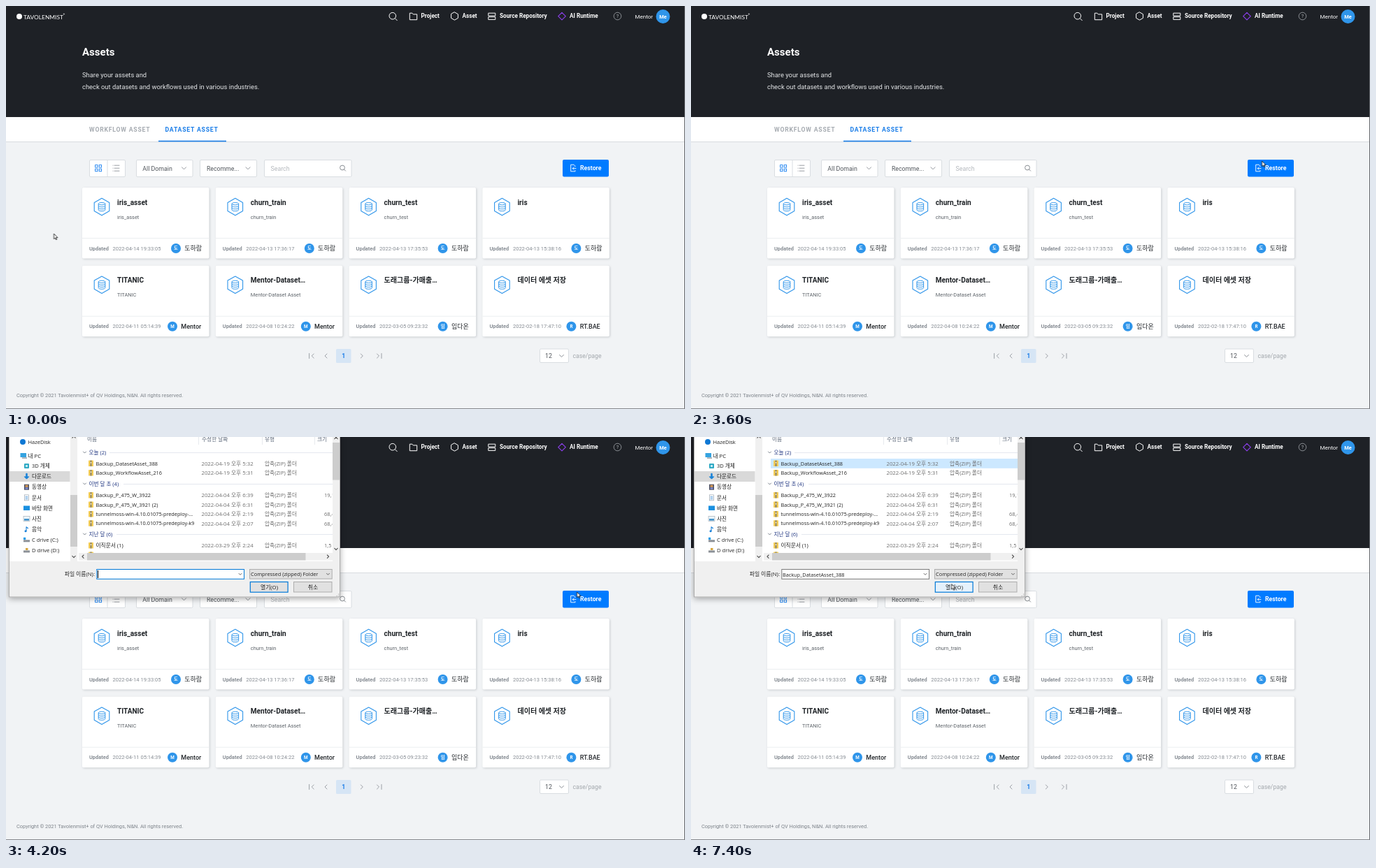
Animation of 971 by 577 pixels, one loop 8 s. Source, as an HTML page:

```html
<!DOCTYPE html>
<html lang="ko">
<head>
<meta charset="utf-8">
<title>Dataset assets</title>
<style>
html, body { margin: 0; width: 100%; height: 100%; overflow: hidden; background: #f1f3f5; }
svg { display: block; font-family: Roboto, "Noto Sans CJK KR", "Noto Sans CJK", sans-serif; }
text { white-space: pre; }
.b { font-weight: 700; }
.m { font-weight: 500; }
.line { fill: none; stroke-linecap: round; stroke-linejoin: round; }
.card { filter: drop-shadow(1px 1.5px 1.5px rgba(40, 50, 60, .2)); }
.dlg { font-family: "Open Sans", "Noto Sans CJK KR", "Noto Sans CJK", sans-serif; transform-origin: 240.5px 59px; }
.frame { filter: drop-shadow(0 2px 4px rgba(0, 0, 0, .35)); }
</style>
</head>
<body>
<script>
const LOOP = 8000;
const BLUE = '#2f95ea';
let css = '';

// Hard-stepped keyframes from [ms, declarations] pairs.
function steps(name, list) {
  const keys = list.map(([ms, decl]) => `${ms / LOOP * 100}% { ${decl} }`).join(' ');
  css += `@keyframes ${name} { ${keys} } .${name} { animation: ${name} ${LOOP}ms step-end infinite; }\n`;
}
// Visible only within the given [from, to] spans.
function visible(name, ...spans) {
  const list = [[0, 'opacity: 0']];
  for (const [from, to] of spans) {
    list.push([from, 'opacity: 1']);
    if (to < LOOP) list.push([to, 'opacity: 0']);
  }
  steps(name, list);
}

const text = (x, y, size, str, fill, extra = '') =>
  `<text x="${x}" y="${y + size * .36}" font-size="${size}" fill="${fill}" ${extra}>${str}</text>`;
const rect = (x, y, w, h, fill, extra = '') =>
  `<rect x="${x}" y="${y}" width="${w}" height="${h}" fill="${fill}" ${extra}/>`;
const path = (d, color, w = 1, extra = '') =>
  `<path class="line" d="${d}" stroke="${color}" stroke-width="${w}" ${extra}/>`;
const circle = (x, y, r, fill, extra = '') =>
  `<circle cx="${x}" cy="${y}" r="${r}" fill="${fill}" ${extra}/>`;
const at = (x, y, body, extra = '') => `<g transform="translate(${x} ${y})" ${extra}>${body}</g>`;
const chevron = (x, y, turn, color, s = 3, w = .9) =>
  path(`M${-s} ${-s / 2}L0 ${s / 2}L${s} ${-s / 2}`, color, w, `transform="translate(${x} ${y}) rotate(${turn})"`);
const lens = (x, y, r, color, w) =>
  circle(x, y, r, 'none', `stroke="${color}" stroke-width="${w}"`) +
  path(`M${x + r * .75} ${y + r * .75}l${r * .6} ${r * .6}`, color, w);
const box = (x, y, w, h) => rect(x + .5, y + .5, w - 1, h - 1, '#fff', 'rx="1.5" stroke="#d9dde1"');
const hexagon = (rx, ry) =>
  `M0 ${-ry}L${rx} ${-ry / 2}V${ry / 2}L0 ${ry}L${-rx} ${ry / 2}V${-ry / 2}Z`;
const MID = 'text-anchor="middle"';

function header() {
  const nav = (x, str) => text(x, 14.5, 8.2, str, '#fff', 'class="b"');
  return rect(0, 0, 971, 159, '#1e2126') +
    circle(19, 15, 4, '#fff') +
    text(25, 15.5, 8.4, 'TAVOLENMIST', '#fff', 'font-family="Lato, sans-serif"') +
    text(81.5, 11.5, 5, '+', '#fff') +
    lens(552.8, 14.2, 4.8, '#fff', 1) +
    path('M577.3 19.3V10.2h3.6l1.4 1.7h5.4v7.4z', '#fff') +
    nav(593.5, 'Project') +
    at(641.5, 14.5, path(hexagon(4.9, 5.6), '#fff')) +
    nav(652.5, 'Asset') +
    path('M690.2 10.2h9.6v3.8h-9.6zM690.2 15.6h9.6v3.8h-9.6z', '#fff') +
    nav(706, 'Source Repository') +
    path('M795 9.3l5.3 5.3-5.3 5.3-5.3-5.3z', '#8a3ee8', 1.2) +
    nav(806, 'AI Runtime') +
    circle(874.5, 14.5, 5.3, 'none', 'stroke="#8f9398"') +
    text(874.5, 14.7, 7.5, '?', '#a0a4a8', MID) +
    text(899.5, 15, 8, 'Mentor', '#fff') +
    circle(939.5, 15, 10, BLUE) +
    text(939.5, 15, 7.5, 'Me', '#fff', `class="b" ${MID}`) +
    text(109, 65.5, 15, 'Assets', '#fff', 'class="b"') +
    text(109, 99, 9.4, 'Share your assets and', '#e3e5e7') +
    text(109, 115.5, 9.4, 'check out datasets and workflows used in various industries.', '#e3e5e7');
}

function toolbar() {
  const spaced = 'class="b" letter-spacing=".78"';
  const grid = [[127.6, 227.6], [133.2, 227.6], [127.6, 233.2], [133.2, 233.2]]
    .map(([x, y]) => rect(x, y, 3.4, 3.4, 'none', 'stroke="#1a80f0" stroke-width=".9"')).join('');
  return rect(0, 159, 971, 35, '#fff') + rect(0, 194, 971, 1, '#d8dce0') +
    text(119, 177, 8.7, 'WORKFLOW ASSET', '#a6abb1', spaced) +
    text(227.5, 177, 8.7, 'DATASET ASSET', '#1a7de8', spaced) +
    rect(218, 192.7, 97, 1.6, '#1a7de8') +
    box(119, 220, 52, 25) + rect(144.5, 220, 1, 25, '#d9dde1') + grid +
    path('M155 228.2h7M155 232.2h7M155 236.2h7M153 228.2h.1M153 232.2h.1M153 236.2h.1', '#8d9299', .9) +
    box(186, 220, 81.5, 25) + text(195.3, 232.5, 8.8, 'All Domain', '#50555b') + chevron(254.5, 232.3, 0, '#858a90') +
    box(277, 220, 82, 25) + text(287, 232.5, 8.7, 'Recomme...', '#50555b') + chevron(346, 232.3, 0, '#858a90') +
    box(369, 220, 125.5, 25) + text(378.5, 232.5, 8.8, 'Search', '#b4b8bd') + lens(481, 231.5, 3.4, '#7b8086', .9) +
    rect(796, 220, 66, 24.5, '#007bff', 'rx="2"') +
    path('M814 229.8v-.6l-2-2h-4.3v9.6h6.3v-1.2M815 232.6h-4.6M812 230.8l-1.8 1.8 1.8 1.8', '#fff', .9) +
    text(821, 232.3, 8.75, 'Restore', '#fff', 'class="b"');
}

const cards = [
  ['iris_asset', 'iris_asset', '2022-04-14 19:33:05', '도', '도하람', 243],
  ['churn_train', 'churn_train', '2022-04-13 17:36:17', '도', '도하람', 243],
  ['churn_test', 'churn_test', '2022-04-13 17:35:53', '도', '도하람', 243],
  ['iris', '', '2022-04-13 15:38:16', '도', '도하람', 243],
  ['TITANIC', 'TITANIC', '2022-04-11 05:14:39', 'M', 'Mentor', 238],
  ['Mentor-Dataset…', 'Mentor-Dataset Asset', '2022-04-08 10:24:22', 'M', 'Mentor', 238],
  ['도래그룹-가매출…', '', '2022-03-05 09:23:32', '임', '임다온', 243],
  ['데이터 에셋 저장', '', '2022-02-18 17:47:10', 'R', 'RT.BAE', 236]
];

function card([title, note, date, initial, owner, dot], i) {
  const disk = 'M-4.8 -4.3a4.8 1.7 0 0 1 9.6 0a4.8 1.7 0 0 1 -9.6 0V4.4a4.8 1.7 0 0 0 9.6 0V-4.3' +
    'M-4.8 -1.4a4.8 1.7 0 0 0 9.6 0M-4.8 1.5a4.8 1.7 0 0 0 9.6 0';
  const px = dot - 109;
  const hover = i > 3 ? '' : `<g class="hover${i}">` +
    rect(.5, .5, 180.5, 100.5, 'none', 'rx="2" stroke="#d6dade"') +
    rect(14, 12, 28, 31, '#fff') +
    rect(16.9, 16.5, 9, 9, '#fff', 'stroke="#9a9fa5" stroke-width=".9"') +
    rect(156, 11, 14.5, 14.5, '#fff', 'rx="1.5" stroke="#d9dde1"') +
    [14.8, 18.2, 21.6].map(y => circle(163.2, y, .75, '#84898f')).join('') + '</g>';
  return at(109 + i % 4 * 190.8, i < 4 ? 260 : 371.7,
    rect(0, 0, 181.5, 101.5, '#fff', 'rx="2" class="card"') +
    rect(0, 72, 181.5, 1, '#eceef0') +
    at(28, 27.5, path(hexagon(10.8, 12.2), BLUE, 1.1) + path(disk, BLUE, .95)) +
    text(50, 21, 10.05, title, '#1f2327', 'class="b"') +
    text(50, 42, 7.4, note, '#5d6369') +
    text(10, 87, 7.4, 'Updated', '#878d94', 'class="b"') +
    text(43.5, 87, 7.55, date, '#878d94') +
    circle(px, 87, 7, BLUE) +
    text(px, 87, 6.3, initial, '#fff', `class="b" ${MID}`) +
    text(px + 12.3, 87, 9, owner, '#24282c', 'class="m"') + hover);
}

function footer() {
  const c = '#92979d';
  return chevron(438.7, 501, 90, c) + path('M433.6 497.5v7', c, .9) + chevron(457.5, 501, 90, c) +
    rect(472, 491, 21.5, 20, '#d6e5f5', 'rx="1.5"') + text(482.8, 501, 8.7, '1', '#1a7de8', `class="b" ${MID}`) +
    chevron(508.8, 501, -90, c) + chevron(532, 501, -90, c) + path('M537 497.5v7', c, .9) +
    box(763, 490.5, 42, 20.5) + text(771, 501, 8.7, '12', '#50555b') + chevron(794.5, 501, 0, '#858a90') +
    text(810.5, 501, 8.7, 'case/page', '#a3a8ad') +
    text(15, 557, 7.4, 'Copyright © 2021 Tavolenmist+ of QV Holdings, N&amp;N. All rights reserved.', '#7d838a') +
    rect(970, 0, 1, 577, '#63666a') + rect(0, 576, 971, 1, '#85888c');
}

function sidebar() {
  const folders = [
    ['3D 개체', rect(1, -3.5, 7, 7, '#2fa9c4', 'rx="1"') + rect(3, -1.5, 3, 3, '#bfeaf2')],
    ['다운로드', path('M4.5 -3.5v5', '#1b83d8', 2.6) + path('M1.5 .5l3 3 3-3z', '#1b83d8', 1, 'style="fill:#1b83d8"')],
    ['동영상', rect(1, -4, 7, 8, '#4b4f63') + rect(2.5, -3, 4, 3, '#d79a55') + rect(2.5, .5, 4, 2.5, '#7d8bd0')],
    ['문서', rect(1.5, -4, 6, 8, '#fff', 'stroke="#9fa8b2" stroke-width=".7"') + path('M3 -1.5h3M3 .2h3M3 2h3', '#3d8fd6', .7)],
    ['바탕 화면', rect(0, -3.5, 9, 6.5, '#1a90e0')],
    ['사진', rect(0, -3.5, 9, 7, '#eaf4fb', 'stroke="#9fa8b2" stroke-width=".6"') + rect(1, 0, 7, 2.5, '#3d8fc8')],
    ['음악', path('M4 2.5V-3.5l2.5 2', '#1a80d8', 1.1) + circle(3, 2.5, 1.5, '#1a80d8')],
    ['C drive (C:)', rect(0, 0, 9, 3, '#8b9096') + rect(0, -3.5, 3.2, 3.2, '#1a9be8')],
    ['D drive (D:)', rect(0, 0, 9, 3, '#8b9096') + rect(3, -3.5, 3.5, 3, '#d5a640')]
  ];
  return rect(5, -110, 87, 288, '#fff') + rect(5, 49, 86.5, 15, '#d9d9d9') +
    circle(24, 7, 4, '#0f78d4') + text(31.5, 7, 7.5, 'HazeDisk', '#222') +
    rect(20.5, 23, 8.5, 6, '#35a3e0') + rect(23, 29.5, 7, 1.2, '#7d8790') + text(31.5, 27, 7.7, '내 PC', '#222') +
    folders.map(([name, icon], i) => {
      const y = 41.5 + i * 15.12;
      return at(25, y, icon) + text(37, y, 7.6, name, '#222');
    }).join('') +
    rect(92, -110, 10, 288, '#f0f0f0') + rect(92, 83, 10, 74, '#cdcdcd') +
    chevron(97, 171.5, 0, '#505050', 2.2, 1.1) + chevron(97, 0, 180, '#505050', 2.2, 1.1);
}

const files = [
  [38, 'Backup_DatasetAsset_388', '2022-04-19 오후 5:32'],
  [51.5, 'Backup_WorkflowAsset_216', '2022-04-19 오후 5:31'],
  [83.5, 'Backup_P_475_W_3922', '2022-04-04 오후 6:39', '19,1'],
  [97, 'Backup_P_475_W_3921 (2)', '2022-04-04 오후 6:31'],
  [110.5, 'tunnelmoss-win-4.10.01075-predeploy-...', '2022-04-04 오후 2:19', '68,4'],
  [123.8, 'tunnelmoss-win-4.10.01075-predeploy-k9', '2022-04-04 오후 2:07', '68,4'],
  [155.5, '이직문서 (1)', '2022-03-29 오후 2:24', '1,5'],
  [169, '', '']
];

function fileList() {
  const head = (x, str) => text(x, 3, 7.7, str, '#5a6678');
  const group = (y, str, x) => chevron(112.5, y, 0, '#5a6470', 2, .8) +
    text(118.5, y, 7.6, str, '#1f3580') + rect(x, y, 467 - x, .7, '#d9dee8');
  const band = (row, cls, fill) => rect(114, files[row][0] - 7, 353, 13.8, fill, `class="${cls}"`);
  const row = ([y, name, date, size = '']) =>
    rect(118, y - 4.5, 7, 8.5, '#f4cd57', 'rx=".6"') + rect(120.6, y - 4.5, 1.8, 8.5, '#7f7a68') +
    rect(120.9, y - 2, 1.2, 1.5, '#fff') +
    text(128.5, y, name[0] > 'z' ? 7.7 : 7.3, name, '#222') + text(279.5, y, 7.75, date, '#6d6d6d') +
    (name && text(370, y, 7.7, '압축(ZIP) 폴더', '#6d6d6d')) + text(455, y, 7.5, size, '#6d6d6d');
  return rect(102, -110, 365, 288, '#fff') +
    head(116, '이름') + head(280, '수정한 날짜') + head(370, '유형') + head(445, '크기') +
    [275, 366, 441].map(x => rect(x, -8, .8, 19, '#e2e5ea')).join('') +
    group(22, '오늘 (2)', 148) + group(67, '이번 달 초 (4)', 168) + group(139, '지난 달 (6)', 158) +
    band(2, 'over2', '#e5f3ff') + band(1, 'over1', '#e5f3ff') + band(0, 'over0', '#e5f3ff') +
    band(5, 'over5', '#e5f3ff') + band(0, 'picked', '#cce8ff') +
    `<g clip-path="url(#list)">${files.map(row).join('')}</g>` +
    rect(467, -110, 10.5, 276, '#f0f0f0') + rect(467, 8, 10.5, 53.5, '#cdcdcd') +
    chevron(472, 1.5, 180, '#505050', 2.2, 1.1) + chevron(472, 160.5, 0, '#505050', 2.2, 1.1) +
    rect(104, 166, 363, 10.5, '#f0f0f0') + rect(116, 166, 312.5, 10.5, '#cdcdcd') +
    chevron(110, 171.2, 90, '#505050', 2.2, 1.1) + chevron(460.5, 171.2, -90, '#505050', 2.2, 1.1);
}

function dialog() {
  const grey = 'stroke="#adadad"';
  return `<g class="dlg open">` +
    rect(4, -110, 474, 339.5, '#f0f0f0', 'class="frame"') +
    sidebar() + fileList() +
    rect(5, 178, 472.5, 51, '#f0f0f0') +
    rect(4.4, -110, 473.2, 339, 'none', 'stroke="#9b9b9b" stroke-width=".8"') +
    text(127, 196.5, 7.8, '파일 이름(N):', '#222', 'text-anchor="end"') +
    rect(129.8, 189.5, 210.7, 13.8, '#fff', 'class="field"') +
    chevron(335, 196.4, 0, '#555', 2, .9) +
    rect(131, 191, 1, 11, '#000', 'class="caret"') +
    text(131, 197, 7.3, files[0][1], '#222', 'class="value"') +
    rect(348.5, 189.5, 117.7, 13.5, '#e1e1e1', grey) +
    text(350, 196.5, 7.4, 'Compressed (zipped) Folder', '#222') + chevron(460.5, 196.3, 0, '#555', 2, .9) +
    rect(349.3, 207.5, 53.8, 14.7, '#e1e1e1', 'class="ok" stroke="#0078d7" stroke-width="1.2"') +
    text(376.5, 215.2, 7.8, '열기(O)', '#222', MID) +
    rect(411.5, 207.5, 54.5, 14.5, '#e1e1e1', grey) +
    text(439, 215.2, 7.8, '취소', '#222', MID) +
    [[475, 227], [472.5, 227], [475, 224.5]].map(([x, y]) => rect(x, y, 1.3, 1.3, '#b8b8b8')).join('') + '</g>';
}

function pointer() {
  const arrow = 'M0 0V7.6L1.8 6 3 8.7 4.2 8.2 3 5.6H5.4Z';
  const hand = 'M0 0c.6 0 .9.4.9.9V3.7l3.2.7c.6.1.9.5.8 1.1L4.4 8.3 3.8 10H.5L-2 6.6c-.4-.7.3-1.2.9-.8l.3.3V.9C-.8.4-.5 0 0 0z';
  const draw = (d, cls) => `<path class="${cls}" d="${d}" fill="#fff" stroke="#111" stroke-width=".8"/>`;
  return `<g class="mouse">${draw(arrow, 'arrow')}${draw(hand, 'hand')}</g>`;
}

// Motion: the screen refreshes five times a second.
const route = [
  [0, 68.5, 326], [1000, 96, 329], [1200, 205, 333], [1400, 372, 336], [1600, 545, 333], [1800, 695, 326],
  [2000, 770, 320], [2200, 790, 318], [2400, 796, 318], [2600, 803, 292], [2800, 811, 248], [3000, 816.5, 222],
  [5000, 700, 186], [5200, 500, 132], [5400, 291.5, 71], [5600, 262, 51], [5800, 244, 40], [6000, 240, 37.5],
  [6800, 258, 62], [7000, 310, 128], [7200, 352, 190], [7400, 372.5, 210.5]
];
steps('mouse', route.map(([ms, x, y]) => [ms, `transform: translate(${x}px, ${y}px)`]));
visible('hand', [1200, 2800]);
visible('arrow', [0, 1200], [2800, LOOP]);
visible('hover0', [1200, 1400]);
visible('hover1', [1400, 1600]);
visible('hover2', [1600, 1800]);
visible('hover3', [1800, 2800]);
steps('open', [
  [0, 'opacity: 0; transform: scale(.94)'],
  [3800, 'opacity: .19; transform: scale(.956)'],
  [4000, 'opacity: .8; transform: scale(.99)'],
  [4200, 'opacity: 1; transform: none']
]);
visible('caret', [3800, 4600], [5000, 5600]);
visible('over2', [5400, 5600]);
visible('over1', [5600, 5800]);
visible('over0', [5800, 6000]);
visible('over5', [7000, 7200]);
visible('picked', [6000, LOOP]);
visible('value', [6000, LOOP]);
steps('field', [[0, 'stroke: #0078d7'], [6200, 'stroke: #4a79a0'], [6400, 'stroke: #7a7a7a']]);
steps('ok', [[0, 'fill: #e1e1e1'], [7400, 'fill: #e5f1fb']]);

document.head.insertAdjacentHTML('beforeend', `<style>${css}</style>`);
document.body.innerHTML = `<svg width="971" height="577" viewBox="0 0 971 577">
  <clipPath id="list"><rect x="102" y="0" width="364.5" height="168"/></clipPath>
  ${header()}${toolbar()}${cards.map(card).join('')}${footer()}${dialog()}${pointer()}</svg>`;
</script>
</body>
</html>
```
